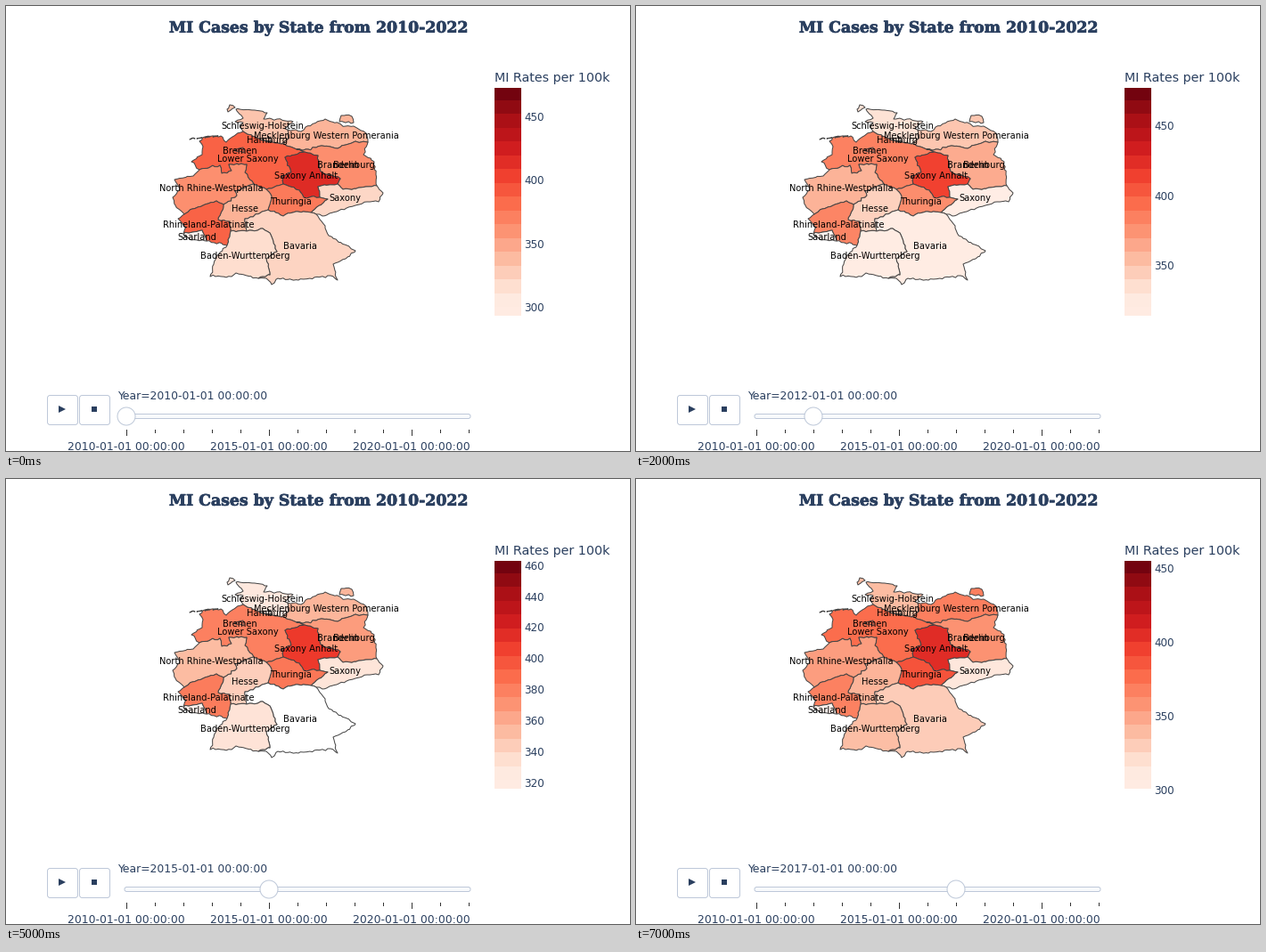
A matplotlib script for the animation above (8 s loop, 700 px wide and 500 px high).

```python
import math
from itertools import zip_longest

import numpy as np
import matplotlib.pyplot as plt
from matplotlib.animation import FuncAnimation
from matplotlib.patches import Circle, FancyBboxPatch, Polygon, Rectangle
from matplotlib.patheffects import withStroke

W, H, DPI = 700, 500, 100
PX = 72 / DPI
INK, EDGE, LINE = "#2a3f5f", "#bec8d9", "#444444"
BAR_TOP, BAR_END = 92, 348

rng = np.random.default_rng(7)
fig = plt.figure(figsize=(W / DPI, H / DPI), dpi=DPI, facecolor="white")
ax = fig.add_axes([0, 0, 1, 1])
ax.set_xlim(0, W)
ax.set_ylim(H, 0)
ax.axis("off")


def text(x, y, s, size, color=INK, ha="left", **kw):
    """Text whose capitals are centred on y; size in pixels."""
    return ax.text(x, y + 0.36 * size, s, fontsize=size * PX, color=color,
                   ha=ha, va="baseline", **{"family": "DejaVu Sans", **kw})


def arc(*pts):
    """Border through a few key points, roughened between them."""
    pts = np.array(pts, float)
    out = [pts[0]]
    for a, b in zip(pts[:-1], pts[1:]):
        n = max(1, round(math.dist(a, b) / 3))
        out += [a + (b - a) * k / n + rng.normal(0, 0.6, 2)
                for k in range(1, n)]
        out.append(b)
    return np.array(out)


def ring(*arcs):
    """Join arcs end to end, flipping them where needed."""
    first, second = arcs[:2]
    ends = [tuple(second[0]), tuple(second[-1])]
    path = [first if tuple(first[-1]) in ends else first[::-1]]
    for a in arcs[1:]:
        path.append(a if tuple(a[0]) == tuple(path[-1][-1]) else a[::-1])
    return np.vstack(path)


# Coasts and outer borders
sh_west = arc((266, 141), (263, 136), (266, 131), (257, 130), (266, 126),
              (258, 116))
sh_east = arc((258, 116), (279, 117), (293, 120), (289, 127), (304, 127),
              (322, 130), (313, 138), (316, 139))
mv_coast = arc((316, 139), (331, 141), (336, 136), (358, 127), (381, 135),
               (390, 135), (404, 143), (406, 153))
ls_west = arc((266, 141), (254, 147), (247, 153), (241, 146), (223, 147),
              (217, 152), (221, 158), (220, 167), (208, 175), (217, 184))
nrw_west = arc((217, 184), (210, 191), (189, 195), (195, 206), (187, 215),
               (190, 224), (200, 234))
rp_west = arc((200, 234), (193, 239), (202, 249), (199, 256))
sl_fr = arc((199, 256), (208, 263), (225, 264))
rp_fr = arc((225, 264), (248, 269))
bw_south = arc((248, 269), (236, 281), (229, 304), (253, 304), (258, 300),
               (283, 306))
by_outer = arc((348, 234), (358, 247), (362, 258), (392, 275), (381, 284),
               (367, 290), (372, 308), (364, 303), (328, 308), (305, 306),
               (298, 313), (292, 306), (283, 306))
sn_east = arc((348, 234), (355, 236), (371, 231), (405, 220), (418, 220),
              (423, 210), (416, 202))
bb_east = arc((406, 153), (401, 167), (413, 175), (416, 202))

# Borders between states
sh_mv = arc((316, 139), (317, 149), (309, 155))
sh_ls = arc((266, 141), (287, 151), (309, 155))
ls_mv = arc((309, 155), (326, 161))
ls_bb = arc((326, 161), (335, 164))
ls_st = arc((335, 164), (313, 170), (320, 187), (309, 191), (311, 200))
ls_th = arc((311, 200), (292, 206))
ls_he = arc((292, 206), (278, 200))
ls_nrw = arc((217, 184), (240, 179), (242, 188), (253, 185), (250, 178),
             (270, 178), (268, 187), (278, 200))
mv_bb = arc((406, 153), (392, 152), (372, 160), (354, 157), (339, 161),
            (326, 161))
bb_st = arc((335, 164), (350, 168), (353, 186), (375, 194), (372, 200))
bb_sn = arc((372, 200), (378, 206), (416, 202))
st_sn = arc((372, 200), (350, 203), (352, 215))
st_th = arc((352, 215), (334, 215), (329, 207), (311, 200))
sn_th = arc((352, 215), (361, 217), (342, 232))
sn_by = arc((342, 232), (348, 234))
th_by = arc((294, 229), (311, 236), (325, 231), (342, 232))
he_th = arc((292, 206), (298, 214), (294, 229))
he_by = arc((294, 229), (268, 239), (270, 253))
he_bw = arc((252, 253), (270, 253))
rp_he = arc((244, 223), (238, 240), (250, 242), (252, 253))
rp_bw = arc((252, 253), (248, 269))
rp_nrw = arc((200, 234), (209, 228), (236, 219), (244, 223))
he_nrw = arc((244, 223), (259, 213), (257, 208), (278, 200))
sl_rp = arc((199, 256), (220, 252), (225, 264))
by_bw = arc((270, 253), (288, 250), (296, 255), (304, 276), (292, 284),
            (296, 302), (283, 306))

# Islands
sylt = arc((249, 119), (248, 116), (251, 111), (257, 114), (249, 119))
ruegen = arc((374, 130), (376, 123), (388, 124), (390, 131), (374, 130))
isles = [arc((x, 150 - k), (x + 6, 149 - k), (x, 150 - k))
         for k, x in enumerate((206, 214, 223, 232))]

areas = []


def state(name, x, y, outlines, base, slope=0, swing=0):
    """Draw a state; its rate drifts and swings over a four-year wave."""
    for pts in outlines:
        area = Polygon(pts, ec=LINE, lw=PX, joinstyle="round")
        areas.append((ax.add_patch(area), base, slope, swing))
    label(name, x, y)


def label(name, x, y):
    text(x, y, name, 9.9, "black", "center", zorder=4)


state("Schleswig-Holstein", 288, 134,
      [ring(sh_west, sh_east, sh_mv, sh_ls), sylt], 333, 0, -6)
state("Mecklenburg Western Pomerania", 359, 145,
      [ring(mv_coast, mv_bb, ls_mv, sh_mv), ruegen], 342, 3.3, -3)
state("Lower Saxony", 271, 171,
      [ring(ls_west, ls_nrw, ls_he, ls_th, ls_st, ls_bb, ls_mv, sh_ls),
       *isles], 387, -1.5)
state("Brandenburg", 381, 178,
      [ring(mv_bb, bb_east, bb_sn, bb_st, ls_bb)], 363, 0, 4)
state("Saxony Anhalt", 337, 190, [ring(ls_st, bb_st, st_sn, st_th)],
      416, -1.5)
state("North Rhine-Westphalia", 230, 204,
      [ring(ls_nrw, he_nrw, rp_nrw, nrw_west)], 362, -1.5, -2)
state("Saxony", 380, 215, [ring(bb_sn, sn_east, sn_by, sn_th, st_sn)],
      321.8, 0, 8)
state("Thuringia", 320, 219, [ring(ls_th, st_th, sn_th, th_by, he_th)],
      374, 1.9)
state("Hesse", 268, 227, [ring(ls_he, he_th, he_by, he_bw, rp_he, he_nrw)],
      343)
state("Rhineland-Palatinate", 227, 245,
      [ring(rp_nrw, rp_he, rp_bw, rp_fr, sl_rp, rp_west)], 386, -2, 5)
state("Bavaria", 330, 269, [ring(th_by, sn_by, by_outer, by_bw, he_by)],
      323, 0, -8)
state("Baden-Wurttemberg", 268, 280, [ring(he_bw, by_bw, bw_south, rp_bw)],
      317, 3)
state("Saarland", 214, 259, [ring(sl_rp, sl_fr)], 490)

# City states
for name, x, y in (("Hamburg", 293, 150), ("Bremen", 262, 162)):
    ax.add_patch(Polygon(arc((x - 6, y), (x + 4, y - 3), (x + 5, y + 3),
                             (x - 6, y)), fc="none", ec=LINE, lw=PX))
    label(name, x, y)
label("Berlin", 381, 178)

text(350, 23.5, "MI Cases by State from 2010-2022", 17.3, ha="center",
     family="DejaVu Serif", weight="bold",
     path_effects=[withStroke(linewidth=0.7 * PX, foreground=INK)])

# Colour bar
text(548, 79.5, "MI Rates per 100k", 14.2)
edges = [BAR_TOP, *np.linspace(106, 338, 16), BAR_END]
for top, end in zip(edges, edges[1:]):
    mid = (BAR_END - (top + end) / 2) / (BAR_END - BAR_TOP)
    ax.add_patch(Rectangle((548, top), 30, end - top, lw=0,
                           fc=plt.cm.Reds(max(mid, 0.06)), aa=False))
ticks = [text(581, 0, "", 12) for _ in range(9)]

# Lowest and highest rate of each year
SCALES = [(293, 473), (315, 469), (314, 477), (314, 485.6),
          (315, 474), (316, 463), (310, 485.6), (301, 455)]


def box(x, y, w, h, r, **kw):
    ax.add_patch(FancyBboxPatch((x, y), w, h, ec=EDGE, lw=PX,
                                boxstyle=f"round,pad=0,rounding_size={r}",
                                **kw))


# Buttons
for x in (46.5, 82.5):
    box(x, 437.5, 34, 33, 3, fc="white")
ax.add_patch(Polygon([(59, 449), (67, 453), (59, 457)], fc=INK, lw=0))
ax.add_patch(Rectangle((96, 450), 6, 6, fc=INK, lw=0))

# Slider
box(133, 458.5, 388, 5, 2.4, fc="#f8fafc")
for k in range(13):
    x, major = 135 + 32 * k, k % 5 == 0
    ax.add_patch(Rectangle((x, 476), 1, 7 if major else 4, fc="#333333",
                           lw=0, aa=False))
    if major:
        text(x, 495, f"{2010 + k}-01-01 00:00:00", 12.4, ha="center")
knob = ax.add_patch(Circle((135, 461), 10, fc="white", ec=EDGE, lw=PX,
                           zorder=5))
year = text(125, 438, "", 12.33)


def draw(i):
    low, high = SCALES[i]
    span = high - low
    for area, base, slope, swing in areas:
        rate = base + slope * i + swing * math.sin(math.pi * i / 2)
        t = min((rate - low) / span, 1)
        area.set_facecolor(plt.cm.Reds(t) if t > 0.01 else "white")

    step = 20 if span < 150 else 50
    values = [v for v in range(300, 481, step) if low - 2 <= v <= high]
    for tick, v in zip_longest(ticks, values):
        tick.set_text("" if v is None else v)
        if v is not None:
            y = BAR_TOP + (high - v) / span * (BAR_END - BAR_TOP)
            tick.set_y(y + 4.6)

    knob.center = (135 + 32 * i, 461)
    year.set_text(f"Year={2010 + i}-01-01 00:00:00")
    return []


anim = FuncAnimation(fig, draw, frames=8, init_func=lambda: draw(0),
                     interval=1000, repeat=True, repeat_delay=0)
plt.show()
```
